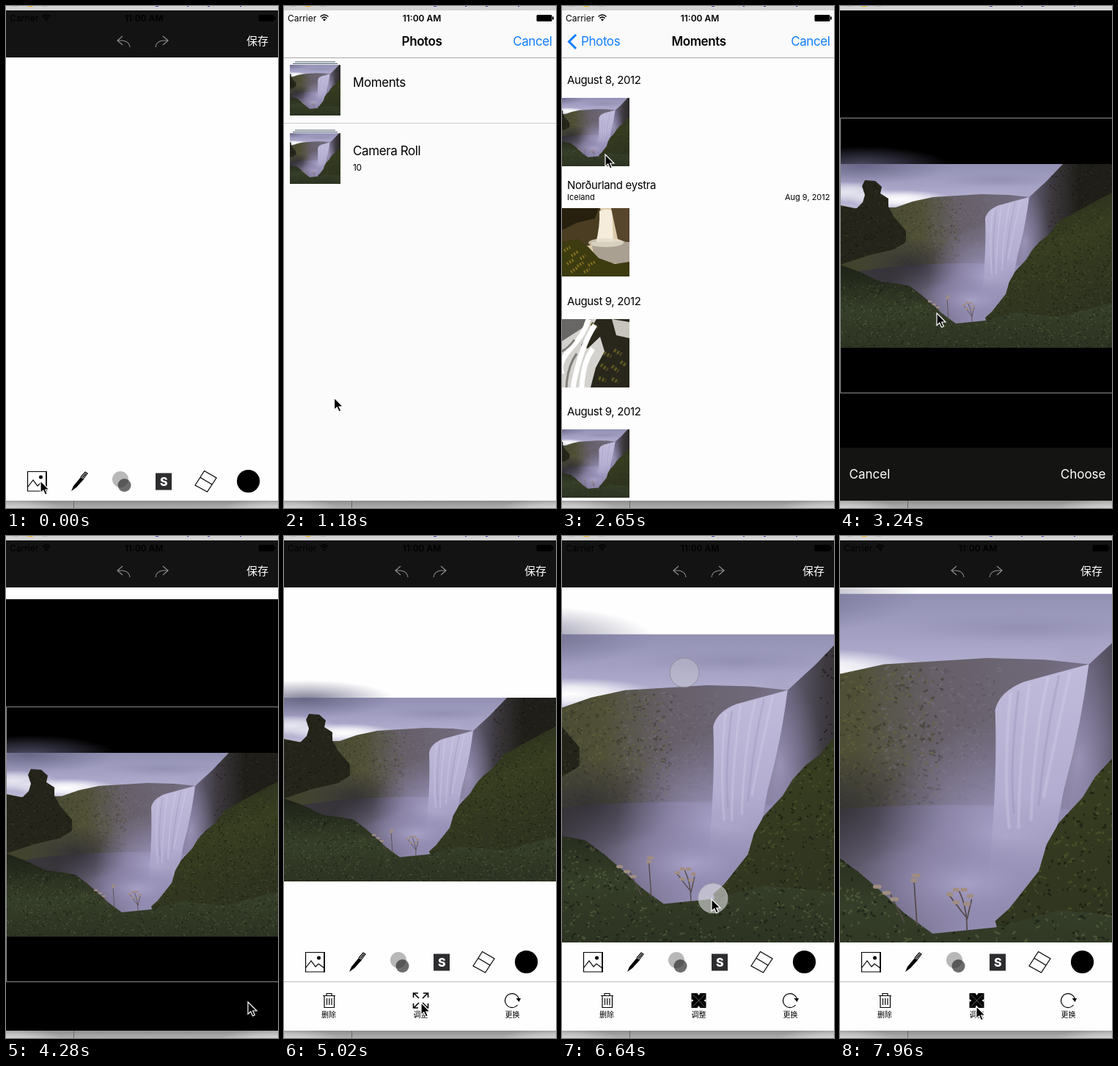
These frames come from a looping animation (371 px wide and 683 px high, 8 s). An HTML page:

```html
<!DOCTYPE html>
<html lang="zh">
<head>
<meta charset="utf-8">
<title>Photo editor</title>
<style>
  html, body { margin: 0; width: 100%; height: 100%; overflow: hidden; background: #fff; }
  svg { display: block; }
  #stage { width: 371px; height: 683px; font: 17px Inter, "Noto Sans CJK SC", "Noto Sans CJK", sans-serif; }
  text { letter-spacing: -.024em; }
  .head { font-size: 15px; }
  .small { font-size: 11px; letter-spacing: 0; }
  .bold { font-weight: 600; }
  .mid { text-anchor: middle; }
  .end { text-anchor: end; }
  .blue { fill: #147efb; }
  .plain { letter-spacing: 0; }
  .line { fill: none; stroke: #000; stroke-width: 1.2; }
</style>
</head>
<body>
<svg id="stage" viewBox="0 0 371 683">
  <defs>
    <linearGradient id="sky" x2="0" y2=".25">
      <stop offset="0" stop-color="#9290b3"/><stop offset=".5" stop-color="#a6a3c7"/><stop offset="1" stop-color="#bebbd8"/>
    </linearGradient>
    <linearGradient id="hillTone">
      <stop offset="0" stop-color="#3f412b"/><stop offset=".38" stop-color="#505038"/><stop offset=".55" stop-color="#665f68"/><stop offset="1" stop-color="#777087"/>
    </linearGradient>
    <linearGradient id="pool" gradientUnits="userSpaceOnUse" x1="70" y1="150" x2="190" y2="180">
      <stop offset="0" stop-color="#39363c"/><stop offset=".4" stop-color="#625c70"/><stop offset="1" stop-color="#958eb4"/>
    </linearGradient>
    <linearGradient id="water" x2="0" y2="1">
      <stop offset="0" stop-color="#c0bbda"/><stop offset=".55" stop-color="#b3add1"/><stop offset="1" stop-color="#a29bc0" stop-opacity="0"/>
    </linearGradient>
    <linearGradient id="cliffTone">
      <stop offset="0" stop-color="#7a7392"/><stop offset=".35" stop-color="#3d393f"/><stop offset=".65" stop-color="#1f1e18"/>
    </linearGradient>
    <linearGradient id="slopeTone" x2=".3" y2="1">
      <stop offset="0" stop-color="#24281a"/><stop offset=".45" stop-color="#363d20"/><stop offset="1" stop-color="#2b301f"/>
    </linearGradient>
    <linearGradient id="meadowTone" x2="0" y2="1">
      <stop offset="0" stop-color="#1d2217"/><stop offset=".55" stop-color="#353e28"/><stop offset="1" stop-color="#2c3322"/>
    </linearGradient>
    <radialGradient id="mist">
      <stop offset="0" stop-color="#aca5cb" stop-opacity=".95"/><stop offset=".45" stop-color="#958eb4" stop-opacity=".65"/><stop offset="1" stop-color="#8982a8" stop-opacity="0"/>
    </radialGradient>
    <radialGradient id="shade"><stop stop-color="#302d33" stop-opacity=".8"/><stop offset="1" stop-color="#35323a" stop-opacity="0"/></radialGradient>
    <radialGradient id="cloud"><stop stop-color="#5e5c7a" stop-opacity=".8"/><stop offset="1" stop-color="#6a6888" stop-opacity="0"/></radialGradient>
    <radialGradient id="glow"><stop stop-color="#fff"/><stop offset=".45" stop-color="#fff" stop-opacity=".75"/><stop offset="1" stop-color="#fff" stop-opacity="0"/></radialGradient>
    <linearGradient id="edge"><stop stop-opacity="0"/><stop offset="1" stop-opacity=".2"/></linearGradient>
    <linearGradient id="desk" x2="0" y2="1"><stop stop-color="#8e8e8e"/><stop offset="1" stop-color="#b0b0b0"/></linearGradient>

    <path id="hill" d="M0 56L20 60L76 59L99 51L127 45L160 43L193 41L230 42L258 45L290 60V200H0Z"/>
    <path id="cliff" d="M257 46L270 34L281 24L304 0H371V130H262L244 150Q252 90 257 46Z"/>
    <path id="slope" d="M371 39L335 58L299 78L284 97L273 105L262 117L254 130L239 146L231 160L226 177L207 201L198 209L202 222L290 250H371Z"/>
    <path id="rock" d="M0 57L22 61L31 52L34 42L30 30L34 22L48 23L57 31L55 40L66 47L66 58L73 71L90 91V106L74 116L40 124L0 137Z"/>
    <path id="meadow" d="M0 137L25 146L55 160L80 163L95 166L111 178L125 190L140 204L158 217L198 213L240 202L300 208L371 188V250H0Z"/>
    <clipPath id="in-hill"><use href="#hill"/></clipPath>
    <clipPath id="in-cliff"><use href="#cliff"/></clipPath>
    <clipPath id="in-slope"><use href="#slope"/></clipPath>
    <clipPath id="in-rock"><use href="#rock"/></clipPath>
    <clipPath id="in-meadow"><use href="#meadow"/></clipPath>

    <g id="photo">
      <rect width="371" height="250" fill="url(#sky)"/>
      <ellipse cx="30" cy="2" rx="120" ry="26" fill="url(#cloud)"/>
      <ellipse cx="215" cy="22" rx="80" ry="10" fill="url(#cloud)" opacity=".25"/>
      <ellipse cx="82" cy="48" rx="72" ry="13" fill="url(#glow)"/>
      <ellipse cx="10" cy="38" rx="60" ry="14" fill="url(#glow)" opacity=".7"/>
      <use href="#hill" fill="url(#hillTone)"/>
      <g id="hill-marks"></g>
      <path d="M0 150Q120 128 250 138V250H0Z" fill="url(#pool)"/>
      <ellipse cx="95" cy="136" rx="75" ry="38" fill="url(#shade)"/>
      <use href="#cliff" fill="url(#cliffTone)"/>
      <g id="cliff-marks"></g>
      <ellipse cx="205" cy="155" rx="85" ry="75" fill="url(#mist)"/>
      <ellipse cx="252" cy="105" rx="34" ry="75" fill="url(#mist)" opacity=".7"/>
      <path d="M198 74Q201 62 217 56L258 45Q253 85 242 125L228 200H192Q200 125 198 74Z" fill="url(#water)"/>
      <path d="M208 63Q203 110 207 150M220 57Q213 110 213 150M232 53Q223 90 221 145M246 50Q237 90 229 130" fill="none" stroke="#d8d4ec" stroke-width="2" opacity=".3"/>
      <path d="M213 62Q207 110 210 140M239 52Q230 90 226 135" fill="none" stroke="#8f88ae" stroke-width="1.5" opacity=".3"/>
      <ellipse cx="180" cy="185" rx="75" ry="32" fill="url(#mist)" opacity=".85"/>
      <use href="#slope" fill="url(#slopeTone)"/>
      <g id="slope-marks"></g>
      <use href="#rock" fill="#24241a"/>
      <g id="rock-marks"></g>
      <use href="#meadow" fill="url(#meadowTone)"/>
      <g id="meadow-marks"></g>
      <path d="M180 215Q180 200 175 190M179 206L169 193M180 208L183 195M148 212L146 182M140 210L131 192" fill="none" stroke="#554a48" stroke-width=".8"/>
      <path d="M168 192h2m2-3h2m3 0h2m2 4h2m-11 4h2m5 1h2m-35-18h3m-4 3h2m-20 8h3m2 4h3m-14-8h3" stroke="#a08d82" stroke-width="2.5" stroke-linecap="round"/>
    </g>

    <g id="gorge">
      <rect width="92" height="93" fill="#dcc9a8"/>
      <path d="M0 0H52L56 22L48 48L0 60Z" fill="#4a3d22"/>
      <path d="M0 0H50L45 14L20 20L0 30Z" fill="#27200f"/>
      <path d="M51 4Q58 0 68 3L70 48H46Q52 25 51 4Z" fill="#f5ecdb"/>
      <path d="M67 0H92V48L76 42Z" fill="#57452c"/>
      <path d="M40 46H92V75H46Z" fill="#aaa092"/>
      <ellipse cx="60" cy="47" rx="24" ry="6" fill="#e4dccb" opacity=".8"/>
      <path d="M0 46L22 42L36 53L50 68L72 76L92 73V93H0Z" fill="#3d3b10"/>
      <path d="M3 58l8-5m2 12l9-6m3 10l7-5M7 76l9-6m5 9l8-5m7 4l9-5M12 87l9-6m9 6l8-4" stroke="#85741f" stroke-width="4" stroke-dasharray="2 2"/>
    </g>
    <g id="rapids">
      <rect width="92" height="93" fill="#d4d2ce"/>
      <path d="M0 0H40L28 12L0 30Z" fill="#686765"/>
      <path d="M47 0H92V93H39L46 66L58 44L52 24L35 40L26 36Z" fill="#29261c"/>
      <path d="M68 0L92 4V26L74 22Z" fill="#c8c5bf"/>
      <path d="M40 6l9 6m8 34l10 5m4-9l10 6M53 62l9 7m6-5l9 7m3-13l8 6M50 80l10 4m8-3l9 5" stroke="#5d581f" stroke-width="5" stroke-dasharray="3 2"/>
      <path d="M36 0Q31 20 12 40T0 75M45 8Q25 38 15 93M42 40Q28 60 27 93" fill="none" stroke="#fff" stroke-width="7"/>
      <path d="M0 44Q10 38 17 28M6 93Q7 65 20 47" fill="none" stroke="#827f7b" stroke-width="3"/>
    </g>

    <svg id="thumb" width="93" height="93" viewBox="60 0 250 250"><use href="#photo"/></svg>
    <g id="album">
      <path d="M15 0h55M12 2.5h61" stroke="#42536a" stroke-width="1.2"/>
      <svg x="8" y="4" width="69" height="69" viewBox="60 0 250 250"><use href="#photo"/></svg>
    </g>
    <clipPath id="canvas"><rect y="70" width="371" height="483"/></clipPath>
    <path id="undo" class="line" d="M7 -7L0 -1L7 5M0 -1H7Q16 0 17 8" style="stroke:#8b8b8b"/>
  </defs>

  <g id="editor">
    <rect width="371" height="683" fill="#fefefe"/>
    <g clip-path="url(#canvas)"><use id="picture" href="#photo"/></g>
    <rect y="6" width="371" height="64" fill="#131313"/>
    <use href="#undo" x="152" y="48"/>
    <use href="#undo" transform="translate(221 48) scale(-1 1)"/>
    <text class="head plain" x="328" y="53" fill="#fff" style="letter-spacing:0">保存</text>

    <g id="tools">
      <path class="line" d="M29.500 -13.500H55V13H29.500ZM30 7L37 -2L43 6L47 2L55 8"/>
      <path d="M55 -14V13.500" stroke="#000" stroke-width="1.8"/>
      <circle cx="47.500" cy="-6" r="2.500"/>
      <path d="M89 13L92 6L102 -6L106 -3L96 8Z"/>
      <path class="line" d="M102 -6L108 -13L111 -11L105 -3M104 -5L109 -11"/>
      <circle cx="156" cy="-3" r="11" fill="#b8b8b8"/>
      <circle cx="161.500" cy="5" r="9" fill="#333" opacity=".72"/>
      <rect x="204" y="-11.500" width="22" height="23" fill="#2d2d2f"/>
      <text class="mid" x="215" y="6" fill="#fff" style="font-weight:800;font-size:16px">S</text>
      <path class="line" d="M270.500 -14.500L287 -5L274.500 14L258 5ZM265 -5.500L281 4"/>
      <circle cx="330.500" cy="-.5" r="15.600"/>
    </g>

    <g id="actions">
      <path d="M0 606.500H371" stroke="#bcbcbc"/>
      <path class="line" d="M53 625.500H70M58 625V622.500H65V625M55 626V641.500H68.500V626M58.500 629V638M61.700 629V638M65 629V638"/>
      <path id="expand" class="line" d="M176.500 628V622H183M190 622H196.500V628M196.500 636V642H190M183 642H176.500V636M177 622L184 629M196 622L189 629M196 642L189 635M177 642L184 635" style="stroke-width:1.6"/>
      <g id="expanded">
        <rect x="176.500" y="622" width="20" height="20"/>
        <path d="M184.500 622h4l-2 3zM184.500 642h4l-2 -3zM176.500 630v4l3 -2zM196.500 630v4l-3 -2z" fill="#fff"/>
        <path d="M178 623.500L195 640.500M195 623.500L178 640.500" stroke="#888" stroke-width=".7"/>
      </g>
      <path class="line" d="M318.500 638A9.500 9.500 0 1 1 320.500 631"/>
      <path d="M316.500 629H323L320.500 634Z"/>
      <g class="mid" font-size="10">
        <text class="plain" x="61" y="655">删除</text><text class="plain" x="186.500" y="655">调整</text><text class="plain" x="311.500" y="655">更换</text>
      </g>
    </g>
  </g>

  <g id="picker">
    <g id="albums">
      <rect y="6" width="375" height="667" fill="#fbfbfb"/>
      <rect id="pressed" y="71" width="375" height="88" fill="#d2d2d2"/>
      <path d="M0 159.500H375" stroke="#cbcbcb"/>
      <use href="#album" y="76"/>
      <use href="#album" y="169"/>
      <text x="94" y="110">Moments</text>
      <text x="94" y="203">Camera Roll</text>
      <text x="94" y="224" style="font-size:12px">10</text>
    </g>
    <g id="moments">
      <rect x="-8" y="70" width="8" height="603" fill="url(#edge)"/>
      <rect y="6" width="375" height="667" fill="#fdfdfd"/>
      <g class="head">
        <text x="7" y="106">August 8, 2012</text>
        <text x="7" y="249">Norðurland eystra</text>
        <text x="7" y="407">August 9, 2012</text>
        <text x="7" y="557">August 9, 2012</text>
      </g>
      <text class="small" x="7" y="264">Iceland</text>
      <text class="small end" x="365.500" y="264">Aug 9, 2012</text>
      <use href="#thumb" x="-1" y="125"/>
      <use href="#gorge" y="275"/>
      <use href="#rapids" y="426"/>
      <use href="#thumb" x="-1" y="576"/>
    </g>
    <rect y="6" width="371" height="64" fill="#fafafa"/>
    <path d="M0 70.500H371" stroke="#a9a9a9"/>
    <text id="oldTitle" class="bold mid" x="188" y="54">Photos</text>
    <g id="back" class="blue">
      <path d="M19 39L9.500 48.500L19 58" fill="none" stroke="#147efb" stroke-width="3"/>
      <text x="26" y="54">Photos</text>
    </g>
    <text id="newTitle" class="bold mid" x="186.500" y="54">Moments</text>
    <text class="blue end" x="365.500" y="54">Cancel</text>
    <g id="crop">
      <rect y="6" width="375" height="667"/>
      <use href="#photo" y="215"/>
      <path d="M375 152.500H.5V526.500H375" fill="none" stroke="#8c8c8c"/>
      <rect y="601" width="375" height="72" fill="#141413"/>
      <text class="plain" x="12.500" y="643" fill="#fff">Cancel</text>
      <text class="plain end" x="362.500" y="643" fill="#fff">Choose</text>
    </g>
  </g>

  <g id="status">
    <text class="plain" x="5" y="20.500" font-size="12">Carrier</text>
    <path d="M49.500 14.500Q55 9.500 60.500 14.500M51.500 16.800Q55 13.500 58.500 16.800" fill="none" stroke="#000" stroke-width="1.5"/>
    <path d="M53 18.500Q55 16.500 57 18.500L55 20.500Z"/>
    <text class="plain bold mid" x="188" y="20.500" font-size="12">11:00 AM</text>
    <rect x="344.500" y="12" width="21" height="9" rx="1.500"/><rect x="366" y="14.500" width="1.800" height="4"/>
  </g>

  <g id="frame">
    <rect width="371" height="6" fill="#d3d3d3"/>
    <g fill="#b9b9b9"><path d="M8 0Q13 2 18 0M48 0Q53 2 58 0"/><path d="M28 0Q33 2.500 38 0" fill="#efb52e"/></g>
    <path d="M204 0.500h4M247 .5h2M275 .5h3M319 .5h2" stroke="#3c45b0"/>
    <svg y="673" width="371" height="10">
      <rect width="371" height="10" fill="url(#desk)"/>
      <ellipse cy="10" rx="75" ry="14" fill="url(#glow)" opacity=".45"/>
      <ellipse cx="371" cy="10" rx="75" ry="14" fill="url(#glow)" opacity=".45"/>
      <path d="M92.500 0V10" stroke="#686868"/>
    </svg>
  </g>

  <g id="touches" fill="#c6c6cc" fill-opacity=".45" stroke="#85838c" stroke-opacity=".75">
    <circle id="touchA" r="20"/><circle id="touchB" r="20" fill="#e0dfe3" fill-opacity=".6" stroke="#bbb"/>
  </g>
  <path id="cursor" d="M0 0V16.500L3.800 13L6.500 19L9.300 17.700L6.700 12H12Z" stroke="#fff" stroke-width="1.200"/>
</svg>

<script>
const $ = id => document.getElementById(id);
const LOOP = 8000, START = 733, STEP = 147.4, WIDTH = 375, HEIGHT = 667;

function random(seed) {
  return () => (seed = (seed * 16807) % 2147483647) / 2147483647;
}

// Scatters short strokes over a box, cut to the shape of the same name.
function texture(name, color, count, [x, y, w, h], opacity) {
  const rnd = random(count * 31 + color.length + x + y);
  let d = "";
  for (let i = 0; i < count; i++) {
    const at = `M${(x + rnd() * w).toFixed(1)} ${(y + rnd() * h).toFixed(1)}`;
    d += `${at}l${(rnd() * 5 - 2).toFixed(1)} ${(rnd() * 4 - 2).toFixed(1)}`;
  }
  $(name + "-marks").innerHTML +=
    `<path clip-path="url(#in-${name})" d="${d}" fill="none" stroke="${color}" stroke-width="1.2" opacity="${opacity}"/>`;
}
texture("hill", "#2c2e1b", 330, [70, 46, 95, 110], .45);
texture("hill", "#66683a", 260, [70, 50, 90, 85], .5);
texture("hill", "#827a86", 200, [125, 45, 75, 85], .35);
texture("hill", "#4d4750", 200, [120, 48, 78, 100], .35);
texture("cliff", "#0f0f0c", 170, [285, 0, 86, 110], .5);
texture("cliff", "#3c3b33", 110, [295, 0, 76, 90], .5);
texture("slope", "#14170d", 750, [198, 35, 173, 215], .65);
texture("slope", "#586030", 650, [198, 60, 173, 165], .5);
texture("rock", "#43432c", 190, [0, 22, 92, 115], .55);
texture("rock", "#10100b", 180, [0, 22, 92, 115], .65);
texture("meadow", "#12160f", 850, [0, 137, 371, 113], .6);
texture("meadow", "#68744a", 720, [0, 165, 371, 85], .45);

// Keys are [step, value, ...]; values between keys are interpolated.
function at(keys, step) {
  const next = keys.findIndex(key => key[0] >= step);
  if (next === 0) return keys[0].slice(1);
  if (next < 0) return keys.at(-1).slice(1);
  const a = keys[next - 1], b = keys[next];
  const p = (step - a[0]) / (b[0] - a[0]);
  return a.slice(1).map((v, i) => v + (b[i + 1] - v) * p);
}

const sheetKeys = [[-1, 1], [0, .8], [1, .25], [2, .05], [3, 0], [23, 0], [24, .12], [25, .65], [26, .93], [27, 1]];
const momentsKeys = [[8, 1], [9, .843], [10, .32], [11, .08], [12, .01], [13, 0]];
const cropKeys = [[14, 1], [15, .85], [16, .25], [17, 0]];
const zoomKeys = [[36, 1], [37, 1.1], [40, 1.69], [42, 2.02], [43, 2.13]];
const cursorKeys = [
  [2, 47, 646], [4, 90, 420], [6, 148, 150], [7, 152, 124], [10, 152, 124], [13, 59, 202], [15, 59, 202],
  [17, 132, 418], [19, 255, 570], [21, 325, 632], [22, 330, 634], [26, 330, 634], [28, 205, 637], [29, 187, 635],
  [32, 187, 635], [34, 200, 460], [35, 203, 425], [36, 203, 425], [40, 204, 494], [43, 209, 556],
  [44, 217, 533], [45, 217, 533], [47, 194, 620], [48, 187, 638], [49, 186, 640]
];

const move = (id, x, y = 0) => $(id).setAttribute("transform", `translate(${x} ${y})`);
const show = (id, on) => { $(id).style.display = on ? "" : "none"; };
const fade = (id, opacity) => { $(id).style.opacity = opacity; };

function draw(step) {
  const [sheet] = at(sheetKeys, step), [push] = at(momentsKeys, step), [crop] = at(cropKeys, step);
  const [zoom] = at(zoomKeys, step), [x, y] = at(cursorKeys, step);
  const chosen = step >= 22, adjusting = step >= 30;

  show("picture", chosen);
  $("picture").setAttribute("transform", `translate(186 345) scale(${zoom}) translate(-186 -125)`);
  move("tools", 0, chosen ? 580 : 647);
  show("actions", chosen);
  show("expand", !adjusting);
  show("expanded", adjusting);

  show("picker", sheet < 1);
  move("picker", 0, sheet * HEIGHT);
  move("albums", -.3 * (1 - push) * WIDTH);
  show("pressed", step >= 9);
  show("moments", push < 1);
  move("moments", push * WIDTH);
  move("oldTitle", -(1 - push) * 105);
  fade("oldTitle", Math.max(0, 1 - (1 - push) * 1.8));
  fade("back", Math.max(0, 1 - push * 1.3));
  move("newTitle", push * 150);
  fade("newTitle", Math.max(0, 1 - push * 1.3));
  show("crop", crop < 1);
  move("crop", crop * WIDTH);

  show("touches", step >= 35 && step <= 43);
  move("touchB", x + 2, y - 1);
  move("touchA", 371 - x, 680 - y);
  move("cursor", x, y);
}

let shown;
function tick(now) {
  const step = Math.max(-1, Math.floor((now % LOOP - START) / STEP));
  if (step !== shown) draw(shown = step);
  requestAnimationFrame(tick);
}
draw(-1);
requestAnimationFrame(tick);
</script>
</body>
</html>
```
